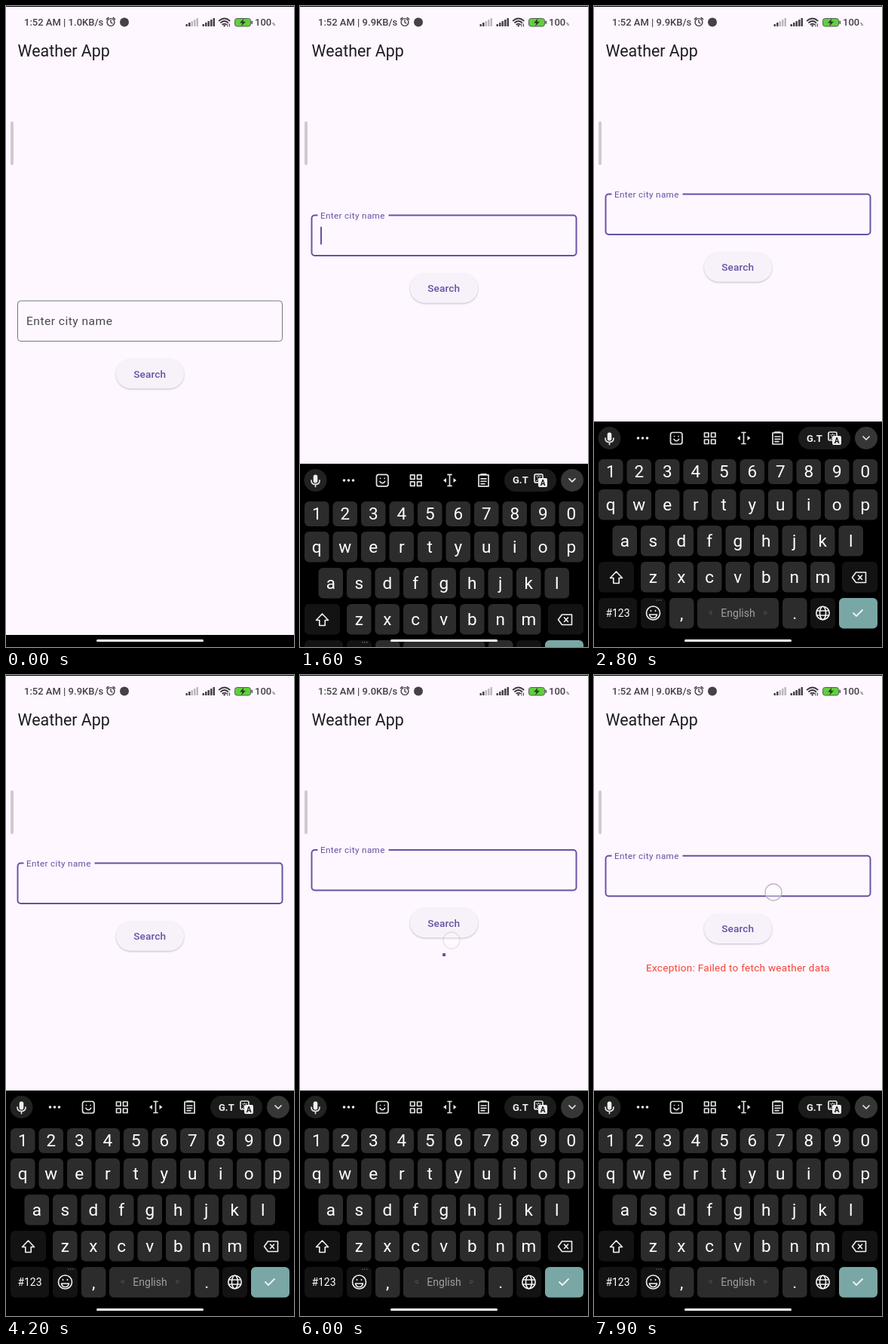
These frames come from a looping animation (382 px wide and 850 px high, 8 s). An HTML page:

```html
<!DOCTYPE html>
<html lang="en">
<head>
<meta charset="utf-8">
<title>Weather App</title>
<style>
  html, body { margin: 0; width: 100%; height: 100%; overflow: hidden; background: #fef7ff; }
  svg { display: block; width: 382px; height: 850px; font-family: Roboto, sans-serif; }
  .line { fill: none; stroke-linecap: round; stroke-linejoin: round; }
  #button { filter: drop-shadow(0 1px 1px rgba(0, 0, 0, .24)); }
</style>
</head>
<body>
<svg viewBox="0 0 382 850">
  <rect width="382" height="850" fill="#fef7ff"/>
  <rect width="382" height="1" fill="#000"/>

  <g fill="#454147">
    <text id="clock" x="24" y="26" font-size="13" font-weight="500"></text>
    <g class="line" stroke="#454147" stroke-width="1.4">
      <circle cx="139" cy="21.5" r="4.9"/>
      <path d="M139 18.8v3l2 1.2M133.3 17.6l2.6-2.2M144.7 17.6l-2.6-2.2"/>
    </g>
    <circle cx="157" cy="21.5" r="6"/>
    <g id="signal"></g>
    <g class="line" stroke="#3d393f" stroke-width="1.9">
      <path d="M282.7 19.4q7-5.6 14 0M285 22q4.700-3.800 9.400 0M287.300 24.500q2.400-1.800 4.800 0"/>
    </g>
    <circle cx="289.700" cy="26.300" r="1.200"/>
    <path d="M294 27.500v-4M296.500 23.500v4" stroke="#454147"/>
    <rect x="303.500" y="16.500" width="21" height="10.500" rx="3" fill="#62cf3c" stroke="#55605a"/>
    <rect x="325.500" y="19.500" width="1.500" height="4.500" rx=".7"/>
    <path d="M315.500 16.500l-5.500 6h3.500l-1.500 4.500 6-6.300h-3.700z" fill="#29372a"/>
    <text x="330" y="26" font-size="13" font-weight="500">100</text>
    <text x="353" y="26" font-size="6" font-weight="500">%</text>
  </g>

  <text x="15.500" y="66.500" font-size="21.400" fill="#1d1b20">Weather App</text>
  <rect x="6" y="153" width="4" height="58" rx="2" fill="#d0c9d1"/>

  <g id="form">
    <rect id="border" x="15.500" y="391" width="351" height="53.500" rx="4" fill="none"/>
    <rect id="gap" x="23.500" y="388" height="6" fill="#fef7ff"/>
    <text id="label" font-size="15.550" letter-spacing=".49">Enter city name</text>
    <rect id="cursor" x="27" y="406" width="2" height="24" rx="1" fill="#6750a4"/>
    <rect id="button" x="146" y="468.300" width="90" height="39" rx="19.500" fill="#f7f2fa"/>
    <text x="169.300" y="492.700" font-size="13.600" font-weight="500" letter-spacing=".1" fill="#6750a4">Search</text>
    <path id="spinner" fill="none" stroke="#6750a4" stroke-width="3.900" stroke-linecap="square"/>
    <text id="error" x="69" y="544.700" font-size="13.600" letter-spacing=".25" fill="#f44336">Exception: Failed to fetch weather data</text>
  </g>

  <circle id="touch" r="11" fill="#fff" fill-opacity=".4" stroke="#bdb7c0" stroke-width="1.300"/>

  <rect y="834" width="382" height="16" fill="#000"/>
  <g id="keyboard">
    <rect width="382" height="310" fill="#000"/>
    <circle cx="20.500" cy="22" r="15" fill="#222"/>
    <rect x="271" y="7" width="69" height="30" rx="15" fill="#1b1b1b"/>
    <circle cx="361" cy="22" r="15" fill="#363636"/>
    <g class="line" stroke="#e4e4e4" stroke-width="1.700">
      <path d="M15 22q0 5.500 5.500 5.500T26 22M20.500 27.500v3"/>
      <rect x="101.500" y="14.500" width="15.500" height="15.500" rx="3"/>
      <path d="M106 23.500q3.300 4.500 6.600 0M106.500 19.500h.1M112 19.500h.1"/>
      <path d="M146.500 15h5.500v5.500h-5.500zM155.500 15h5.500v5.500h-5.500zM146.500 24h5.500v5.500h-5.500zM155.500 24h5.500v5.500h-5.500z"/>
      <path d="M196 14.500h5M198.500 14.500v15M196 29.500h5"/>
      <path d="M237 15h13v15h-13zM240 14h7M240 20h7M240 23.300h7M240 26.600h5"/>
      <path d="M357 20l4 4 4-4"/>
      <rect x="311" y="14" width="11" height="11" rx="2"/>
    </g>
    <g fill="#eee">
      <rect x="17.700" y="14.500" width="5.600" height="11" rx="2.800"/>
      <circle cx="58.500" cy="22" r="1.800"/><circle cx="64.500" cy="22" r="1.800"/><circle cx="70.500" cy="22" r="1.800"/>
      <path d="M194 19v6l-4-3zM203.500 19v6l4-3z"/>
      <text x="282" y="26.500" font-size="13" font-weight="700">G.T</text>
      <text x="312.500" y="22.500" font-size="8" font-family="Noto Sans CJK SC, Noto Sans CJK, sans-serif">文</text>
      <rect x="316" y="19" width="12" height="12" rx="2"/>
      <text x="322" y="28.700" font-size="10" font-weight="700" text-anchor="middle" fill="#111">A</text>
    </g>
    <g id="keys"></g>
    <g class="line" stroke="#f2f2f2" stroke-width="1.600">
      <path d="M29.500 199l8 8.500h-4.300v7h-7.400v-7h-4.300z"/>
      <path d="M347.500 200h13v13.500h-13l-5-6.750zM350.500 204l5 5.500M355.500 204l-5 5.500"/>
      <circle cx="78.500" cy="254" r="9"/>
      <path d="M73.500 256h10q-1 4.500-5 4.500t-5-4.500M75.500 250.500v1M81.500 250.500v1"/>
      <circle cx="303.500" cy="254" r="8.700"/>
      <ellipse cx="303.500" cy="254" rx="4" ry="8.700"/>
      <path d="M295.500 251h16M295.500 257h16"/>
      <path d="M344 254l4 4 8-8" stroke-width="1.800"/>
    </g>
    <path d="M156 251v5l-4-2.500zM226 251v5l4-2.500z" fill="none" stroke="#565656" stroke-width=".8"/>
    <path d="M82 237h1.500M85 237h1.500M88 237h1.500" stroke="#777" stroke-width="1.200"/>
  </g>
  <rect x="120" y="840" width="142" height="3" rx="1.500" fill="#fff"/>
</svg>
<script>
const LOOP = 8000;
const FOCUS = 1400, LOADING = 6000, FAILED = 6800, SWIPE = 7500;
const $ = id => document.getElementById(id);
const clamp = v => Math.min(1, Math.max(0, v));
const mix = (a, b, p) => a + (b - a) * p;
const mixColor = (a, b, p) => `rgb(${a.map((v, i) => Math.round(mix(v, b[i], p)))})`;
const show = (id, on) => $(id).setAttribute('visibility', on ? 'visible' : 'hidden');
const attrs = (id, values) => {
  for (const name in values) $(id).setAttribute(name, values[name]);
};

// cubic-bezier(.4, 0, .2, 1), solved by bisection
function ease(x) {
  x = clamp(x);
  let lo = 0, hi = 1, u = .5;
  for (let i = 0; i < 24; i++) {
    u = (lo + hi) / 2;
    const at = 1.2 * u * (1 - u) ** 2 + .6 * u * u * (1 - u) + u ** 3;
    if (at < x) lo = u; else hi = u;
  }
  return 3 * u * u * (1 - u) + u ** 3;
}

function buildKeyboard() {
  const key = (x, y, w, h, text = '', fill = '#2c2c2c', size = 22.5, color = '#fff') =>
    `<rect x="${x}" y="${y}" width="${w}" height="${h}" rx="6" fill="${fill}"/>` +
    `<text x="${x + w / 2}" y="${y + h / 2 + size * .35}" font-size="${size}" text-anchor="middle" fill="${color}">${text}</text>`;
  const row = (chars, x, y, h) =>
    [...chars].map((c, i) => key(x + i * 37.5, y, 32.5, h, c)).join('');
  const dark = '#131313';
  $('keys').innerHTML =
    row('1234567890', 6, 50, 33) +
    row('qwertyuiop', 6, 90, 40.5) +
    row('asdfghjkl', 24.5, 138, 40.5) +
    row('zxcvbnm', 62, 186, 40.5) +
    key(6, 186, 47, 40.5, '', dark) + key(329, 186, 47, 40.5, '', dark) +
    key(6, 234, 51, 40.5, '#123', dark, 14) + key(62, 234, 33, 40.5, '', dark) +
    key(100, 234, 32.5, 40.5, ',') +
    key(137, 234, 108, 40.5, 'English', '#2c2c2c', 14, '#a0a0a0') +
    key(250, 234, 32.5, 40.5, '.') + key(287, 234, 33, 40.5, '', dark) +
    key(325, 234, 51, 40.5, '', '#79a7a5');
}

function buildSignal() {
  const bars = (x, strong) => Array.from({ length: 5 }, (_, i) => {
    const h = 3 + i * 2;
    return `<rect x="${x + i * 3.5}" y="${27 - h}" width="2.500" height="${h}" rx=".6" opacity="${i < strong ? 1 : .35}"/>`;
  }).join('');
  $('signal').innerHTML = bars(238.5, 2) + bars(260.5, 5);
}

function spinnerPath(ms) {
  const cycle = ms / 1333 % 1, arc = Math.PI * 1.5, r = 17.5, cy = 547.5;
  const head = ease(cycle * 2), tail = ease(cycle * 2 - 1);
  const start = -Math.PI / 2 + tail * arc + ms / 2222 * 2 * Math.PI + cycle * Math.PI / 2;
  const sweep = Math.max((head - tail) * arc, .001);
  const point = a => `${191 + r * Math.cos(a)} ${cy + r * Math.sin(a)}`;
  return `M${point(start)}A${r} ${r} 0 ${sweep > Math.PI ? 1 : 0} 1 ${point(start + sweep)}`;
}

function drawTouch(t) {
  if (t >= SWIPE) {
    const p = ease((t - SWIPE) / 400);
    attrs('touch', { cx: mix(243, 238, p), cy: mix(382, 288, p), opacity: 1 });
  } else {
    attrs('touch', { cx: 201, cy: 352, opacity: t < 5800 ? 0 : .35 * clamp((6080 - t) / 80) });
  }
}

function draw(t) {
  const rate = t < 1000 ? '1.0' : t < 5000 ? '9.9' : '9.0';
  $('clock').textContent = `1:52 AM | ${rate}KB/s`;

  const rise = 1 - (1 - clamp((t - FOCUS) / 400)) ** 2.4;
  const top = mix(850, 551, rise);
  attrs('keyboard', { transform: `translate(0 ${top})` });
  show('keyboard', t > FOCUS);

  const loading = t >= LOADING && t < FAILED, failed = t >= FAILED;
  const extra = loading ? 17.5 : failed ? 9.8 : 0;
  const shift = Math.max(0, 834 - top) / 2 + extra;
  attrs('form', { transform: `translate(0 ${-shift})` });

  const focus = ease((t - FOCUS) / 167);
  const purple = [103, 80, 164];
  attrs('border', { stroke: mixColor([121, 116, 126], purple, focus), 'stroke-width': mix(1, 1.95, focus) });
  attrs('gap', { width: 94 * focus });
  attrs('label', {
    transform: `translate(27 ${mix(423, 395.2, focus)}) scale(${mix(1, .75, focus)})`,
    fill: mixColor([73, 69, 79], purple, focus)
  });
  show('cursor', t >= 1300 && Math.floor((t - 1300) / 500) % 2 === 0);

  show('spinner', loading);
  if (loading) attrs('spinner', { d: spinnerPath(t - LOADING) });
  show('error', failed);
  drawTouch(t);
}

buildKeyboard();
buildSignal();
const begin = performance.now();
function tick() {
  draw((performance.now() - begin) % LOOP);
  requestAnimationFrame(tick);
}
tick();
</script>
</body>
</html>
```
